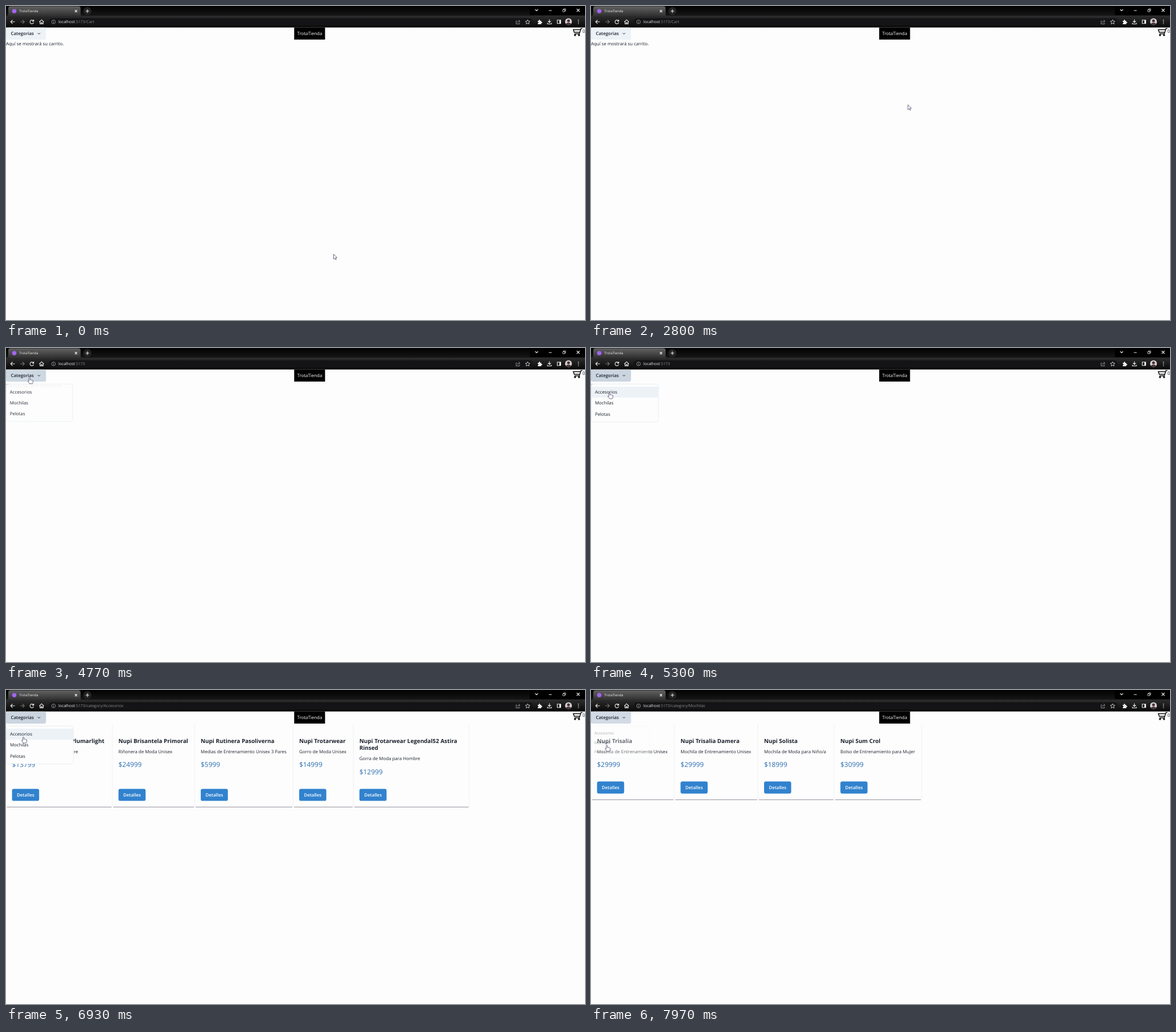
An HTML page that plays this animation: 1017 px wide and 551 px high, repeating every 8 s.

```html
<!DOCTYPE html>
<html lang="es">
<head>
<meta charset="utf-8">
<title>TrotaTienda</title>
<style>
html, body { margin: 0; width: 100%; height: 100%; overflow: hidden; background: #fdfdfd; }
svg { display: block; }
text { font: 7.9px "Open Sans", "Noto Sans", sans-serif; fill: #1a202c; text-rendering: geometricPrecision; }
.title { font-size: 9.88px; font-weight: 700; }
.price { font-size: 11.86px; fill: #2b6cb0; }
.semi { font-weight: 600; }
.white { fill: #fff; }
.mid { text-anchor: middle; }
.url { font-size: 6.95px; fill: #8c8c8c; }
.tab { font-size: 6px; fill: #f1f1f1; }
.icon { fill: none; stroke: #eee; stroke-width: 1.1; }
</style>
</head>
<body>
<svg width="1017" height="551" viewBox="0 0 1017 551">
  <defs>
    <linearGradient id="strip" x2="0" y2="1"><stop stop-color="#020202"/><stop offset="1" stop-color="#171717"/></linearGradient>
    <linearGradient id="tabFill" x2="0" y2="1"><stop stop-color="#626262"/><stop offset="1" stop-color="#303030"/></linearGradient>
    <linearGradient id="bar" x2="0" y2="1"><stop stop-color="#2d2d2d"/><stop offset="1" stop-color="#080808"/></linearGradient>
    <clipPath id="round"><circle cx="988" cy="27.5" r="6"/></clipPath>
  </defs>
  <rect width="1017" height="551" fill="#fdfdfd"/>

  <!-- Browser window -->
  <rect width="1017" height="18" fill="url(#strip)"/>
  <rect x="920" width="97" height="16" fill="#000"/>
  <rect y="17" width="1017" height="20.7" fill="url(#bar)"/>
  <path d="M2 17.5Q4 17 4 14V4Q4 .5 8 .5H127Q131 .5 131 4V14Q131 17 133 17.5Z" fill="url(#tabFill)"/>
  <circle cx="14.5" cy="9" r="3.8" fill="#a364f2"/>
  <text class="tab" x="23.3" y="11.1">TrotaTienda</text>
  <circle cx="143" cy="9" r="7" fill="#242424"/>
  <rect x="75" y="21.5" width="850" height="12.5" rx="6.2" fill="#141416"/>
  <g class="icon">
    <path d="M121 7l4 4m0-4l-4 4M143 6v6M140 9h6M929.5 6l2.5 2.5 2.500-2.500M953.500 8h5M1002.500 5l5 5m0-5l-5 5"/>
    <path d="M978 6.500h3.500V10H978ZM979.500 6.500V5H983v3.500h-1.500" stroke-width=".8"/>
    <path d="M15.500 27.800H8.500M11.500 24.500L8.200 27.800l3.300 3.300"/>
    <path d="M25 27.800h7M29 24.500l3.300 3.300L29 31.100" stroke="#737373"/>
    <path d="M48.200 26A3.300 3.300 0 1 0 48.600 29M48.700 24v2.600H46"/>
    <path d="M58.500 28L62.500 24.200 66.500 28M59.800 27.500v4h2v-2.500h1.500v2.500h2v-4"/>
    <g stroke="#aaa" stroke-width=".8">
      <circle cx="83.500" cy="27.800" r="3.300"/><path d="M83.500 27.300v2.500M83.500 25.700v.9"/>
      <path d="M897.500 26H896v5.500h6V29.500M898 29.500Q898.500 26.500 902.500 26.500M900.500 24.300l2.300 2.200-2.300 2.200"/>
    </g>
    <path d="M916.300 24l1.200 2.600 2.800.3-2.100 1.900.6 2.800-2.500-1.400-2.500 1.400.6-2.800-2.100-1.900 2.800-.3Z" stroke-width=".8"/>
    <path d="M934 26h2q-.5-2 1-2t1 2h2.200v2q1.800-.4 1.800 1t-1.800 1v2H934v-1.800q1.500-.2 1.500-1.200t-1.500-1.200Z" fill="#eee" stroke="none"/>
    <path d="M954.500 23.500v5M952 26.500l2.500 2.500 2.500-2.500M951 29.500v2h7v-2"/>
    <path d="M968.300 24.800h6v6h-6Z"/><path d="M972 25h2.300v6H972Z" fill="#eee" stroke="none"/>
    <path d="M1005.500 24v1.400m0 1.700v1.400m0 1.700v1.400" stroke-width="1.400"/>
  </g>
  <g clip-path="url(#round)">
    <rect x="982" y="21" width="12" height="13" fill="#d9d1d3"/>
    <circle cx="988" cy="26" r="2.500" fill="#4a3436"/><ellipse cx="988" cy="33" rx="5.500" ry="3.700" fill="#4a3436"/>
  </g>
  <text class="url" x="92" y="30.200"><tspan fill="#eee">localhost</tspan><tspan id="path"></tspan></text>

  <!-- Shop header -->
  <rect id="button" y="37.700" width="70.300" height="21.200" rx="3.200"/>
  <text class="semi" x="8.500" y="51.200">Categorias</text>
  <path d="M55.800 47.300l2.100 2.100 2.100-2.100" fill="none" stroke="#1a202c"/>
  <rect x="506.200" y="37.700" width="54.200" height="21.200" fill="#000"/>
  <text class="white mid" x="533.400" y="51.200">TrotaTienda</text>
  <g fill="none" stroke="#111" stroke-width="1.500">
    <path d="M1012.500 39.500h-2.500l-3 9.200h-8.500M1009 41.500H996.500l1.700 4.800h9.300"/>
    <circle cx="999.500" cy="51" r="1.100"/><circle cx="1006.500" cy="51" r="1.100"/>
  </g>
  <text x="1012.500" y="47">0</text>

  <g id="page"></g>
  <g id="menu"></g>
  <g id="cursor" stroke="#4b4668" stroke-width=".8" stroke-linejoin="round" fill="#fff">
    <path id="arrow" d="M0 0V8.600L2 6.800 3.400 9.700 4.700 9.100 3.400 6.200H6Z"/>
    <path id="hand" d="M-1 1Q0-.6 1 1V4.300Q2.200 3.500 3 4.500 4.200 4 4.700 5 6 4.700 6 6V8Q6 9.500 5 11H0Q-.8 9.200-3 7-3.300 5.400-1 6.600Z"/>
  </g>
</svg>
<script>
const $ = id => document.getElementById(id);
const LOOP = 8000;

const text = (x, y, str, cls = "") => `<text x="${x}" y="${y}" class="${cls}">${str}</text>`;

// A row of product cards: [left edge, title lines, description, price]
function cards(list, right, bottom) {
  return list.map(([x, title, note, price], i) => {
    const end = i + 1 < list.length ? list[i + 1][0] : right;
    const lines = title.split("|");
    const dy = 12.7 * (lines.length - 1);
    const left = x + 10.6;
    return `<path d="M${end - .3} 60V${bottom}" stroke="#efeff2" stroke-width=".8"/>
      <path d="M${x + 1.5} ${bottom}H${end - 1.5}" stroke="#92929e"/>`
      + lines.map((line, n) => text(left, 92.6 + 12.7 * n, line, "title")).join("")
      + text(left, 110.6 + dy, note)
      + text(left, 135.1 + dy, "$" + price, "price")
      + `<rect x="${left}" y="${bottom - 32}" width="47.6" height="21.2" rx="3.2" fill="#3182ce"/>`
      + text(left + 23.8, bottom - 18.5, "Detalles", "semi white mid");
  }).join("");
}

const pages = [
  { from: 0, path: ":5173/Cart", body: text(0, 68.5, "Aquí se mostrará su carrito.") },
  { from: 3830, path: ":5173", body: text(0, 68.5, "Bienvenido al e-commerce") },
  { from: 5480, path: ":5173/category/Accesorios", body: cards([
    [0, "Nupi Tel-FIR Marovill Plumarlight", "Gorra de Running para Hombre", 13799],
    [187, "Nupi Brisantela Primoral", "Riñonera de Moda Unisex", 24999],
    [331.5, "Nupi Rutinera Pasoliverna", "Medias de Entrenamiento Unisex 3 Pares", 5999],
    [504.4, "Nupi Trotarwear", "Gorro de Moda Unisex", 14999],
    [610.2, "Nupi Trotarwear Legendal52 Astira|Rinsed", "Gorra de Moda para Hombre", 12999]
  ], 814, 205.4) },
  { from: 7930, path: ":5173/category/Mochilas", body: cards([
    [0, "Nupi Trisalia", "Mochila de Entrenamiento Unisex", 29999],
    [146.7, "Nupi Trisalia Damera", "Mochila de Entrenamiento Unisex", 29999],
    [293.4, "Nupi Solista", "Mochila de Moda para Niño/a", 18999],
    [427.5, "Nupi Sum Crol", "Bolso de Entrenamiento para Mujer", 30999]
  ], 581, 192.6) }
];

$("menu").innerHTML = `<rect x=".3" y=".3" width="118.2" height="66.3" rx="3.2" fill="#fdfdfd" stroke="#e2e8f0" stroke-width=".7"/>`
  + ["Accesorios", "Mochilas", "Pelotas"].map((name, i) =>
    `<rect class="item" x=".6" y="${4.9 + 19.1 * i}" width="117.600" height="19.1" fill="#edf2f7"/>`
    + text(6.9, 17.3 + 19.1 * i, name)).join("");
const items = [...document.querySelectorAll(".item")];

// Pointer path: time, x, y
const moves = [
  [100, 575.5, 435.5], [200, 577, 455], [330, 583, 506], [430, 586.3, 523.5],
  [1970, 586.3, 523.5], [2150, 584, 475], [2500, 570, 290], [2770, 558, 182],
  [3100, 545, 90], [3350, 537, 56], [3530, 534, 49], [4040, 534, 49],
  [4130, 448.5, 61.5], [4300, 210, 66], [4430, 75, 57], [4530, 42, 51],
  [4870, 41, 52], [5060, 36, 68], [5300, 32.5, 78], [5600, 32, 77],
  [5730, 38, 62], [5870, 42.5, 52.5], [6070, 41, 51], [6640, 41, 51],
  [6780, 36, 66], [6930, 30.5, 82], [7150, 29, 90], [7330, 27.8, 96.5]
];
const opens = [[4600, 5480], [6600, 7930]];

const clamp = u => Math.max(0, Math.min(1, u));
const mix = (a, b, u) => a + (b - a) * u;
const blend = (a, b, u) => `rgb(${a.map((v, i) => Math.round(mix(v, b[i], u)))})`;

function pointer(t) {
  const i = moves.findIndex(m => m[0] > t);
  if (i === 0) return moves[0].slice(1);
  if (i < 0) return moves.at(-1).slice(1);
  const [a, b] = [moves[i - 1], moves[i]];
  const u = (t - a[0]) / (b[0] - a[0]);
  return [mix(a[1], b[1], u), mix(a[2], b[2], u)];
}

let shown;
function draw(now) {
  const t = now % LOOP;
  const page = pages.findLast(p => t >= p.from);
  if (page !== shown) {
    shown = page;
    $("path").textContent = page.path;
    $("page").innerHTML = page.body;
  }

  const [x, y] = pointer(t);
  const [start, end] = opens.findLast(o => t >= o[0]) || [LOOP, LOOP];
  const enter = clamp((t - start) / 200), leave = clamp((t - end) / 100);
  const show = enter * enter * (3 - 2 * enter) * (1 - leave) ** 2;
  $("menu").setAttribute("opacity", show);
  $("menu").setAttribute("transform", `translate(0 63) scale(${mix(.8, 1, show)})`);

  const isOpen = t >= start && t < end;
  const overItem = isOpen && x < 118 ? Math.floor((y - 67.9) / 19.1) : -1;
  items.forEach((item, i) => item.setAttribute("opacity", i === overItem ? 1 : 0));

  const overHeader = y > 37 && y < 59;
  const overButton = overHeader && x < 70;
  const active = clamp((t - start) / 200) * (1 - clamp((t - end) / 200));
  $("button").setAttribute("fill", blend(overButton ? [226, 232, 240] : [237, 242, 247], [203, 213, 224], active));

  const hand = overButton || overItem >= 0 || show > 0 && x < 118 && y > 67 || overHeader && x > 506 && x < 560;
  $("hand").setAttribute("display", hand ? "inline" : "none");
  $("arrow").setAttribute("display", hand ? "none" : "inline");
  $("cursor").setAttribute("transform", `translate(${x} ${y})`);
}

const began = performance.now();
(function frame() {
  draw(performance.now() - began);
  requestAnimationFrame(frame);
})();
</script>
</body>
</html>
```
